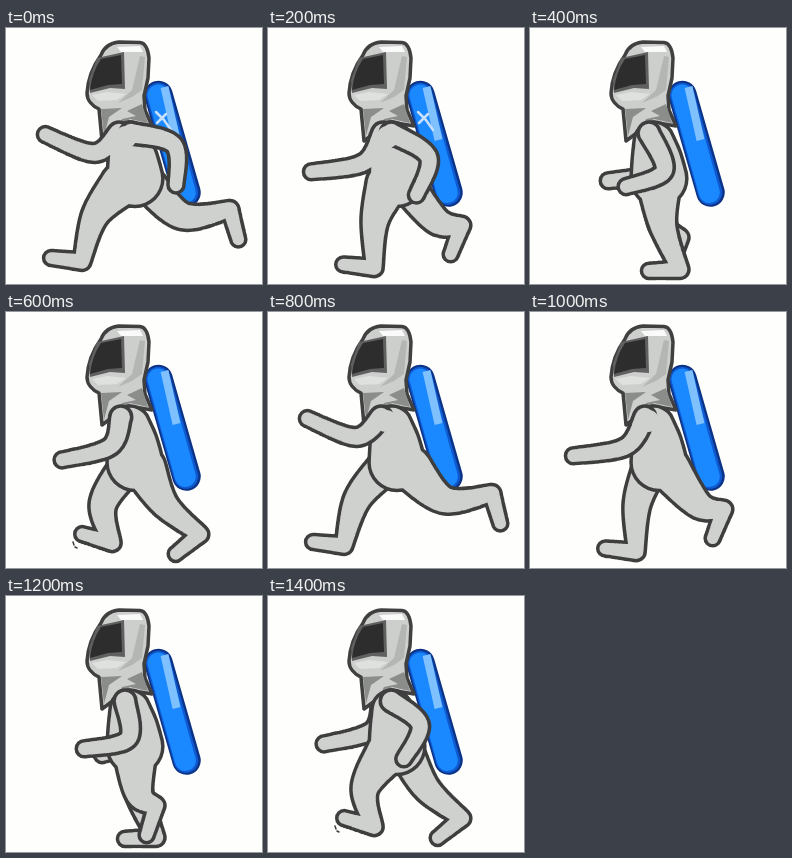
An HTML page for the animation above (1.6 s loop, 256 by 256 pixels).

```html
<!DOCTYPE html>
<html lang="en">
<head>
<meta charset="utf-8">
<title>Running diver</title>
<style>
html, body { margin: 0; width: 100%; height: 100%; overflow: hidden; background: #fefefc; }
svg { display: block; width: 100vw; height: 100vh; }
path { stroke-linecap: round; stroke-linejoin: round; }
</style>
</head>
<body>
<svg viewBox="0 0 256 256">
  <g fill="none">
    <path d="M152.5 67L180.5 164.5" stroke="#0b3488" stroke-width="28.5"/>
    <path d="M152.3 67L180 164.5" stroke="#0f5ad0" stroke-width="24.5"/>
    <path d="M152 67L179.3 164.5" stroke="#1a88ff" stroke-width="21"/>
    <path d="M158.5 59L170.5 112" stroke="#7fc0ff" stroke-width="8" style="stroke-linecap:butt"/>
    <path id="glint" d="M150 84L158 92L165 102M151 95L160 86" stroke="#c8e0fa" stroke-width="2.5"/>
  </g>
  <g id="behind"></g>
  <g>
    <path d="M95 27C98 19 104 15 113 14L134 14.5C140 15 142 21 143 30L142 50L138 68L139 82L146 98L122 94L108 104L96 113L93 81C86 78 81 72 81 65C82 50 87 38 95 27Z" fill="#cdcfcd" stroke="#404040" stroke-width="3.5"/>
    <path d="M111 19L134 18L137 24L115 24Z" fill="#fafafa"/>
    <path d="M134 28L139 29L136 62L126 69L112 75L126 62Z" fill="#b4b6b4"/>
    <path d="M95 81L116 80L103 89L98 108ZM121 83L136 76L142 95L124 91L112 99L116 91L130 88Z" fill="#8b8d8b"/>
    <path d="M91 30L118 24L119 61L104 60L84 65L83 52Z" fill="#606060"/>
    <path d="M95 31L115 27L116 56L102 57L84 62Q86 44 95 31Z" fill="#2d2d2d"/>
    <path d="M86 67L101 64L120 66L111 72L92 73Z" fill="#dfe1df"/>
  </g>
  <g id="front"></g>
</svg>
<script>
const STEP = 200, POSES = 8;
const GREY = '#cfd1cf', INK = '#3e3e3e', HALF_LINE = 1.75;

// Periodic motion: a mean plus cosine and sine harmonics
const wave = (a, mean, cosines, sines = []) =>
  cosines.reduce((sum, c, i) => sum + c * Math.cos((i + 1) * a), mean) +
  sines.reduce((sum, s, i) => sum + s * Math.sin((i + 1) * a), 0);

const disc = ([x, y, r], grow) => {
  r += grow;
  return `M${x - r} ${y}a${r} ${r} 0 1 0 ${2 * r} 0a${r} ${r} 0 1 0 ${-2 * r} 0`;
};

// A brush of changing radius along a Catmull-Rom curve of [x, y, r] joints
function brush(joints) {
  const at = i => joints[Math.max(0, Math.min(joints.length - 1, i))];
  const discs = [];
  for (let i = 0; i < joints.length - 1; i++) {
    for (let u = 0; u <= 1; u += 0.05) {
      discs.push(at(i).map((b, k) => {
        const a = at(i - 1)[k], c = at(i + 1)[k], d = at(i + 2)[k];
        return b + u * (c - a + u * (2 * a - 5 * b + 4 * c - d + u * (3 * (b - c) + d - a))) / 2;
      }));
    }
  }
  return discs;
}

const fill = (discs, grow, color) =>
  `<path d="${discs.map(d => disc(d, grow)).join('')}" fill="${color}"/>`;

// Discs joined into one shape with a single outline
const solid = discs => fill(discs, HALF_LINE, INK) + fill(discs, -HALF_LINE, GREY);

function leg(a, hipSize) {
  const knee = [wave(a, 133, [-44], [0, 5]), wave(a, 193, [0, -5]), 14];
  const heel = [wave(a, 150, [-68, 0, -6]), wave(a, 219.5, [22, -9, 4, -3], [14, -4, -2]), 9];
  const turn = wave(a, 32.5, [-51, 6, -5, 11], [-21, 10, 14]) * Math.PI / 180;
  const toe = [heel[0] - 32 * Math.cos(turn), heel[1] + 32 * Math.sin(turn), 7.5];
  const hip = [129 - 13 * Math.cos(a), 156, hipSize];
  return [...brush([hip, knee, heel]), ...brush([heel, toe])];
}

const shoulder = a => [119 + 6 * Math.cos(a), 105, 11];

function arm(a) {
  const elbow = [wave(a, 128, [40], [6]), wave(a, 132, [-4, -11]), 9.5];
  const hand = [wave(a, 95, [66, 9], [9]), wave(a, 150, [20, -12, 6, -6], [3]), 8];
  return brush([shoulder(a), elbow, hand]);
}

const torso = brush([[124, 114, 20], [127, 133, 25], [129, 151, 28]]);

const scuff = `<path d="M67 230L68 233M69 235L71 236" stroke="${INK}" stroke-width="1.5"/>`;

const layer = id => document.getElementById(id);

function pose(k) {
  const near = k * 2 * Math.PI / POSES, far = near + Math.PI;
  const wide = k % 4 < 2, pushing = k % 4 === 3;
  const farArm = Math.cos(far) < 0.1 ? arm(far) : [];
  const body = [...torso, ...leg(near, 22)];

  layer('behind').innerHTML = (wide ? '' : solid(farArm)) + solid(leg(far, 18));

  let front = solid(wide ? [...body, ...farArm] : body) + solid(arm(near));
  if (wide) {
    // Open the shoulder line so the arm flows into the torso
    const [x, y, r] = shoulder(near);
    front += fill([[x - 5 * Math.cos(near), y + 4, r]], 0, GREY);
  }
  layer('front').innerHTML = front + (pushing ? scuff : '');
  layer('glint').style.display = k < 2 ? '' : 'none';
}

const start = performance.now();
let shown = -1;

function tick() {
  const k = Math.floor((performance.now() - start) / STEP) % POSES;
  if (k !== shown) pose(shown = k);
  requestAnimationFrame(tick);
}
tick();
</script>
</body>
</html>
```
